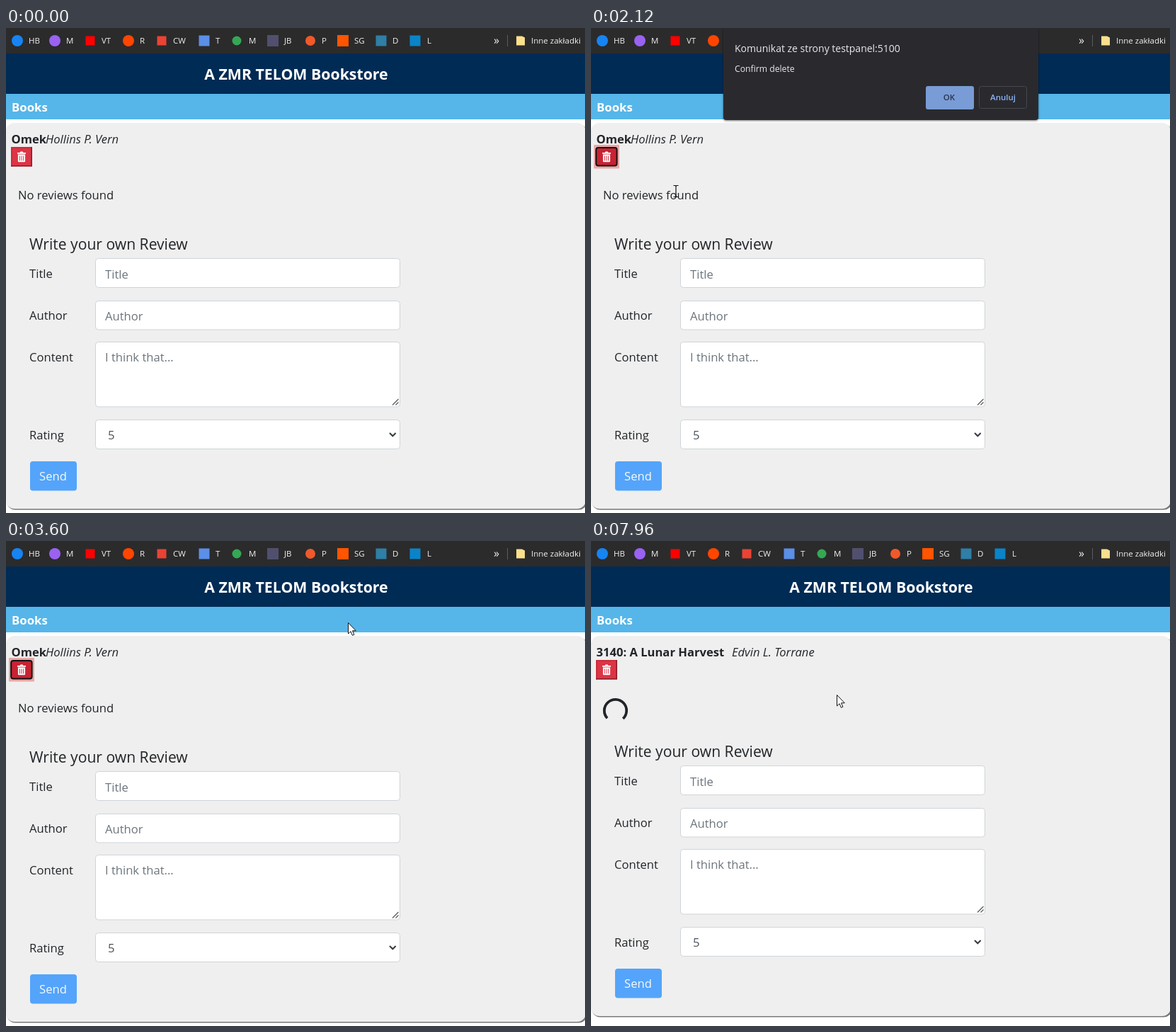
Animation, 818 px wide and 685 px high, one loop 8 s. Source, as an HTML page:

```html
<!DOCTYPE html>
<html lang="en">
<head>
<meta charset="utf-8">
<title>Bookstore</title>
<style>
  html, body { margin: 0; width: 100%; height: 100%; overflow: hidden; background: #fff; }
  svg { display: block; width: 818px; height: 685px; cursor: default; }
  text { font: 16.6px "Open Sans", "Noto Sans", sans-serif; fill: #212529; white-space: pre; }
  .b { font-weight: 700; }
  .i { font-style: italic; }
  .hint { fill: #6c757d; }
  .mid { text-anchor: middle; }
  .field { fill: #fff; stroke: #ced4da; }
  .card { fill: #efefef; }
  .shade { fill: #777; }
  text.mark { font-size: 11.5px; fill: #f1f1f1; }
  .off { display: none; }
</style>
</head>
<body>
<svg viewBox="0 0 818 685" xmlns="http://www.w3.org/2000/svg">
  <defs>
    <g id="info">
      <circle r="8.6" fill="#007bff"/>
      <path d="M-1.4-5h2.8v2.4h-2.8zM-2-1.3h3.4v4.6h.9v1.4h-4.4v-1.4h.9v-3.2h-.8z" fill="#fff"/>
    </g>
    <clipPath id="okClip"><rect x="473" y="82" width="68" height="33" rx="3"/></clipPath>
    <filter id="soft" x="-10%" y="-10%" width="120%" height="130%">
      <feDropShadow dx="0" dy="1" stdDeviation="1.6" flood-opacity=".55"/>
    </filter>
  </defs>

  <rect width="818" height="685" fill="#fff"/>
  <rect width="818" height="37" fill="#2b2b2c"/>
  <g id="marks"></g>
  <text class="mark" x="689" y="22.5" style="font-size:16px">»</text>
  <path d="M708.5 10v16" stroke="#5c5c5e"/>
  <path d="M721 11.5h8l4 2v11h-12z" fill="#fbe08d"/>
  <text class="mark" x="742" y="22">Inne zakładki</text>

  <rect y="36" width="818" height="57.5" fill="#002b55"/>
  <text class="b mid" x="410" y="73" style="font-size:21.3px;fill:#fff">A ZMR TELOM Bookstore</text>
  <rect y="93" width="818" height="36" fill="#56b6e9"/>
  <text class="b" x="8" y="118" style="font-size:16.8px;fill:#fff">Books</text>

  <g id="list">
    <text x="8" y="182" style="font-size:42.6px;font-weight:500">Books</text>
    <rect class="shade" x="10" y="200" width="804" height="44" rx="13"/>
    <rect class="card" x="8" y="198" width="804.5" height="44" rx="13"/>
    <text class="b" x="17" y="227">3140: A Lunar Harvest</text>
    <text class="i" x="209" y="227">Edvin L. Torrane</text>
    <use href="#info" x="344" y="220"/>
    <rect class="shade" x="10" y="252" width="804" height="43.5" rx="13"/>
    <rect class="card" x="8" y="250" width="804.5" height="43.5" rx="13"/>
    <text class="b" x="17" y="279">Feltro</text>
    <text class="i" x="72" y="279">Bronimir Wolk</text>
    <use href="#info" x="194" y="272"/>
  </g>

  <g id="detail">
    <rect class="shade" id="cardShade" x="1" y="136" width="820" rx="12"/>
    <rect class="card" id="card" x="0" y="134" width="819" rx="12"/>
    <g id="first">
      <text class="b" x="7.5" y="162.5">Omek</text>
      <text class="i" x="56" y="162.5">Hollins P. Vern</text>
      <text id="none" x="17" y="242">No reviews found</text>
    </g>
    <g id="second">
      <text class="b" x="7.5" y="162.5">3140: A Lunar Harvest</text>
      <text class="i" x="199" y="162.5">Edvin L. Torrane</text>
      <path id="spin" d="M11.1 11.1A15.7 15.7 0 1 1 11.1-11.1" fill="none" stroke="#212529" stroke-width="3.8"/>
    </g>

    <g id="plain">
      <rect id="red" x="7" y="168" width="30" height="27.5"/>
      <path d="M8 195.5V169H37" fill="none" stroke="#c42b3b" stroke-width="1.5"/>
      <path d="M7 194.7H36.2V168" fill="none" stroke="#8c1c28" stroke-width="1.6"/>
    </g>
    <g id="focus">
      <rect x="4" y="165" width="36" height="33.5" rx="1" fill="#e9a8a6"/>
      <rect x="7.2" y="169" width="29.4" height="25.6" rx="3" fill="#c82333" stroke="#111" stroke-width="2"/>
    </g>
    <path fill="#fff" fill-rule="evenodd" d="M16 176h3.5l1-1.5h3l1 1.5h3.5v1.8h-12zM16.9 178.6h10.2v9.4q0 1.2-1.2 1.2h-7.8q-1.2 0-1.2-1.2zM18.8 180.4v7h1v-7zM21.5 180.4v7h1v-7zM24.2 180.4v7h1v-7z"/>

    <g id="form">
      <text x="33" y="313" style="font-size:21.1px;font-weight:500">Write your own Review</text>
      <text x="33" y="353">Title</text>
      <rect class="field" x="126.5" y="325.5" width="430" height="41" rx="4"/>
      <text class="hint" x="140" y="354">Title</text>
      <text x="33" y="411.5">Author</text>
      <rect class="field" x="126.5" y="385.5" width="430" height="40.5" rx="4"/>
      <text class="hint" x="140" y="412.5">Author</text>
      <text x="33" y="471">Content</text>
      <rect class="field" x="126.5" y="443.5" width="430" height="91.5" rx="4"/>
      <text class="hint" x="140" y="471">I think that...</text>
      <path d="M546 532.5l8.5-8.5M550.5 532.5l4-4" stroke="#555" stroke-width="1.1"/>
      <text x="33" y="581">Rating</text>
      <rect class="field" x="126.5" y="553.5" width="430" height="41" rx="4"/>
      <text x="144" y="581" style="fill:#495057">5</text>
      <path d="M542 572l4.3 4.3 4.3-4.3" fill="none" stroke="#343a40" stroke-width="2"/>
      <rect x="34" y="612" width="66" height="41.5" rx="4" fill="#54a4fb"/>
      <text class="mid" x="66.5" y="639" style="fill:#f9f9f9">Send</text>
    </g>
  </g>

  <g id="dialog">
    <path d="M187 0H632V126q0 4-4 4H191q-4 0-4-4z" fill="#292a2d" filter="url(#soft)"/>
    <text x="203" y="33.5" style="font-size:14px;fill:#e8eaed">Komunikat ze strony testpanel:5100</text>
    <text x="203" y="61.5" style="font-size:12.2px;fill:#e8eaed">Confirm delete</text>
    <rect id="ok" x="473" y="82" width="68" height="33" rx="3"/>
    <text class="mid" x="506" y="102" style="font-size:11.5px;font-weight:600;fill:#27344f">OK</text>
    <circle id="ripple" cx="501" cy="95" fill="#4a5c80" opacity=".32" clip-path="url(#okClip)"/>
    <rect x="548.5" y="82.5" width="67" height="31" rx="3" fill="none" stroke="#45484d"/>
    <text class="mid" x="582" y="102" style="font-size:11.5px;font-weight:600;fill:#8ab4f8">Anuluj</text>
  </g>

  <circle id="press" r="12" fill="#ff0" opacity=".5"/>
  <g id="pointer" stroke-linejoin="round">
    <path id="arrow" d="M.5.5V16l3.5-3.3 2.4 5.6 2.5-1.1-2.4-5.4h4.8z" fill="#fff" stroke="#111"/>
    <path id="beam" d="M-3.5-7.5h2.6l.9.8.9-.8h2.6M0-7V7.500M-3.500 8.500h2.600l.900-.8.900.8h2.600" fill="none" stroke="#111" stroke-width="1.2"/>
    <path id="hand" d="M-2.500 2a2.500 2.500 0 0 1 5 0v6q1-1 2.500 0q1-.7 2.500.3q2-.2 2.500 1.500v6q0 3-2 5v2h-10v-2l-5-7q-1.500-2 .5-2.700q1.500 0 4 3z" fill="#fff" stroke="#111"/>
  </g>
</svg>

<script>
const LOOP = 8000, STEP = 40;
const $ = id => document.getElementById(id);
const show = (id, on) => $(id).classList.toggle('off', !on);
const set = (id, name, value) => $(id).setAttribute(name, value);
const within = (t, a, b) => t >= a && t < b;

// label, label x, icon centre, half size, colour, round
const marks = [
  ['HB', 32, 16, 8, '#1684f2', 1], ['M', 85, 69, 8, '#9a62f0', 1],
  ['VT', 135, 119, 6.5, '#f00', 0], ['R', 189, 173, 8, '#ff4500', 1],
  ['CW', 236, 220, 6.5, '#ea4335', 0], ['T', 296, 280, 7.5, '#5b8fe8', 0],
  ['M', 343, 326, 6.5, '#34a853', 1], ['JB', 393, 377, 8, '#50506e', 0],
  ['P', 446, 430, 7, '#f0592a', 1], ['SG', 492, 476, 8, '#ff5500', 0],
  ['D', 546, 530, 7.5, '#2f7fa6', 0], ['L', 595, 578, 7.5, '#0a84c8', 0]
];
$('marks').innerHTML = marks.map(([label, x, cx, r, color, round]) =>
  `<rect x="${cx - r}" y="${18 - r}" width="${2 * r}" height="${2 * r}" rx="${round ? r : 0}" fill="${color}"/>` +
  `<text class="mark" x="${x}" y="22">${label}</text>`).join('');

// time, x, y of the pointer
const path = [
  [160, 634, 672], [320, 255, 209], [720, 255, 209], [840, 111, 230],
  [960, 111, 230], [1280, 20, 182], [1720, 20, 182], [2120, 120, 230],
  [2320, 120, 230], [3160, 501, 93], [3520, 501, 93], [3800, 411, 203],
  [7240, 411, 203], [7280, 407, 204], [7520, 346, 218], [7800, 346, 218],
  [7960, 347, 217]
];

function pointerAt(t) {
  const n = path.findIndex(k => k[0] > t);
  if (n < 0) return path[path.length - 1].slice(1);
  if (n === 0) return path[0].slice(1);
  const [t0, x0, y0] = path[n - 1], [t1, x1, y1] = path[n];
  const p = (t - t0) / (t1 - t0), e = p * p * (3 - 2 * p);
  return [x0 + (x1 - x0) * e, y0 + (y1 - y0) * e];
}

const inBox = (x, y, l, top, r, b) => x >= l && x <= r && y >= top && y <= b;

function shapeAt(x, y, view, dialog) {
  if (dialog && y < 130 && x > 187) return 'arrow';
  if (view === 'list') return Math.hypot(x - 344, y - 220) < 9 ? 'hand' : 'arrow';
  if (inBox(x, y, 7, 168, 37, 195)) return 'hand';
  if (view === 'first' && inBox(x, y, 17, 224, 152, 248)) return 'beam';
  if (inBox(x, y, 126, 325, 557, 535)) return 'beam';
  return 'arrow';
}

function draw(ms) {
  const t = Math.floor(ms / STEP) * STEP;
  const view = t < 3640 ? 'first' : t < 7720 ? 'list' : 'second';
  const loading = view === 'second';
  const dialog = within(t, 1640, 3600);
  const [x, y] = pointerAt(t);
  const shape = shapeAt(x, y, view, dialog);
  const focused = within(t, 1600, 3640);

  show('list', view === 'list');
  show('detail', view !== 'list');
  show('first', view === 'first');
  show('second', loading);
  show('plain', !focused);
  show('focus', focused);
  set('red', 'fill', view === 'first' && shape === 'hand' ? '#c82333' : '#dc3545');
  set('card', 'height', loading ? 537 : 545);
  set('cardShade', 'height', loading ? 536.5 : 544.5);
  set('form', 'transform', `translate(0 ${loading ? -8 : 0})`);
  set('spin', 'transform', `translate(34.5 239.5) rotate(${92 + (t - 7960) / 750 * 360})`);

  show('dialog', dialog);
  set('ok', 'fill', inBox(x, y, 473, 82, 541, 115) ? '#80a4de' : '#799cd6');
  set('ripple', 'r', Math.max(0, Math.min(36, (t - 3360) / 6)));

  show('press', within(t, 1520, 1600) || within(t, 3360, 3440) || within(t, 7600, 7680));
  set('press', 'transform', `translate(${x - 1} ${y + 1})`);
  show('pointer', t >= 160);
  set('pointer', 'transform', `translate(${Math.round(x)} ${Math.round(y)})`);
  for (const id of ['arrow', 'beam', 'hand']) show(id, id === shape);
}

const start = performance.now();
function tick() {
  draw((performance.now() - start) % LOOP);
  requestAnimationFrame(tick);
}
tick();
</script>
</body>
</html>
```
